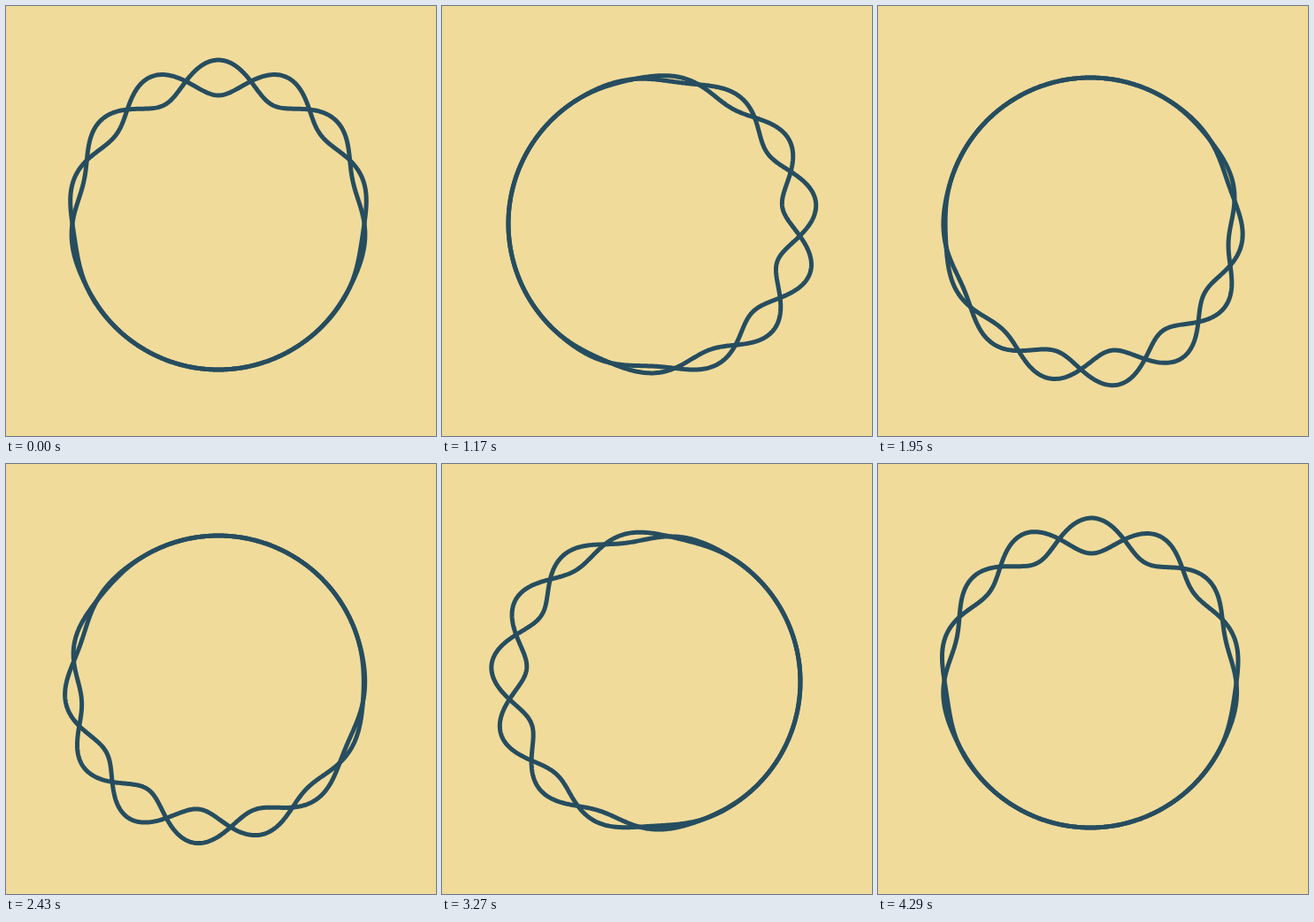
An HTML page for the animation above (4320 ms loop, 486 by 486 pixels).

```html
<!DOCTYPE html>
<html lang="en">
<head>
<meta charset="utf-8">
<title>Braided ring</title>
<style>
  html, body { margin: 0; width: 100%; height: 100%; overflow: hidden; background: #f0db9b; }
  svg { display: block; width: 100%; height: 100%; }
  path { fill: none; stroke: #264d5f; stroke-width: 5; stroke-linejoin: round; }
</style>
</head>
<body>
<svg viewBox="0 0 486 486">
  <path></path>
  <path></path>
</svg>
<script>
  const LOOP = 4320, STEP = 30;
  const CX = 240, CY = 246, RADIUS = 165, AMPLITUDE = 20, WAVES = 7;
  const POINTS = 720, TAU = Math.PI * 2;
  const strands = document.querySelectorAll('path');

  // Wave height fades with the angular distance from the packet's centre.
  function envelope(angle) {
    const distance = Math.abs(Math.atan2(Math.sin(angle), Math.cos(angle)));
    return Math.max(0, Math.cos(distance * 0.56)) ** 4;
  }

  // Angles run clockwise from the top; side is +1 or -1.
  function strandPath(progress, side) {
    const points = [];
    for (let i = 0; i < POINTS; i++) {
      const angle = i / POINTS * TAU;
      const wave = Math.cos(WAVES * angle + 3 * Math.PI * progress);
      const r = RADIUS + side * AMPLITUDE * envelope(angle - TAU * progress) * wave;
      const x = CX + r * Math.sin(angle);
      const y = CY - r * Math.cos(angle);
      points.push(x.toFixed(2) + ' ' + y.toFixed(2));
    }
    return 'M' + points.join('L') + 'Z';
  }

  function draw(time) {
    const progress = Math.floor(time % LOOP / STEP) * STEP / LOOP;
    strands[0].setAttribute('d', strandPath(progress, 1));
    strands[1].setAttribute('d', strandPath(progress, -1));
  }

  let start;
  function tick(now) {
    start ??= now;
    draw(now - start);
    requestAnimationFrame(tick);
  }

  draw(0);
  requestAnimationFrame(tick);
</script>
</body>
</html>
```
